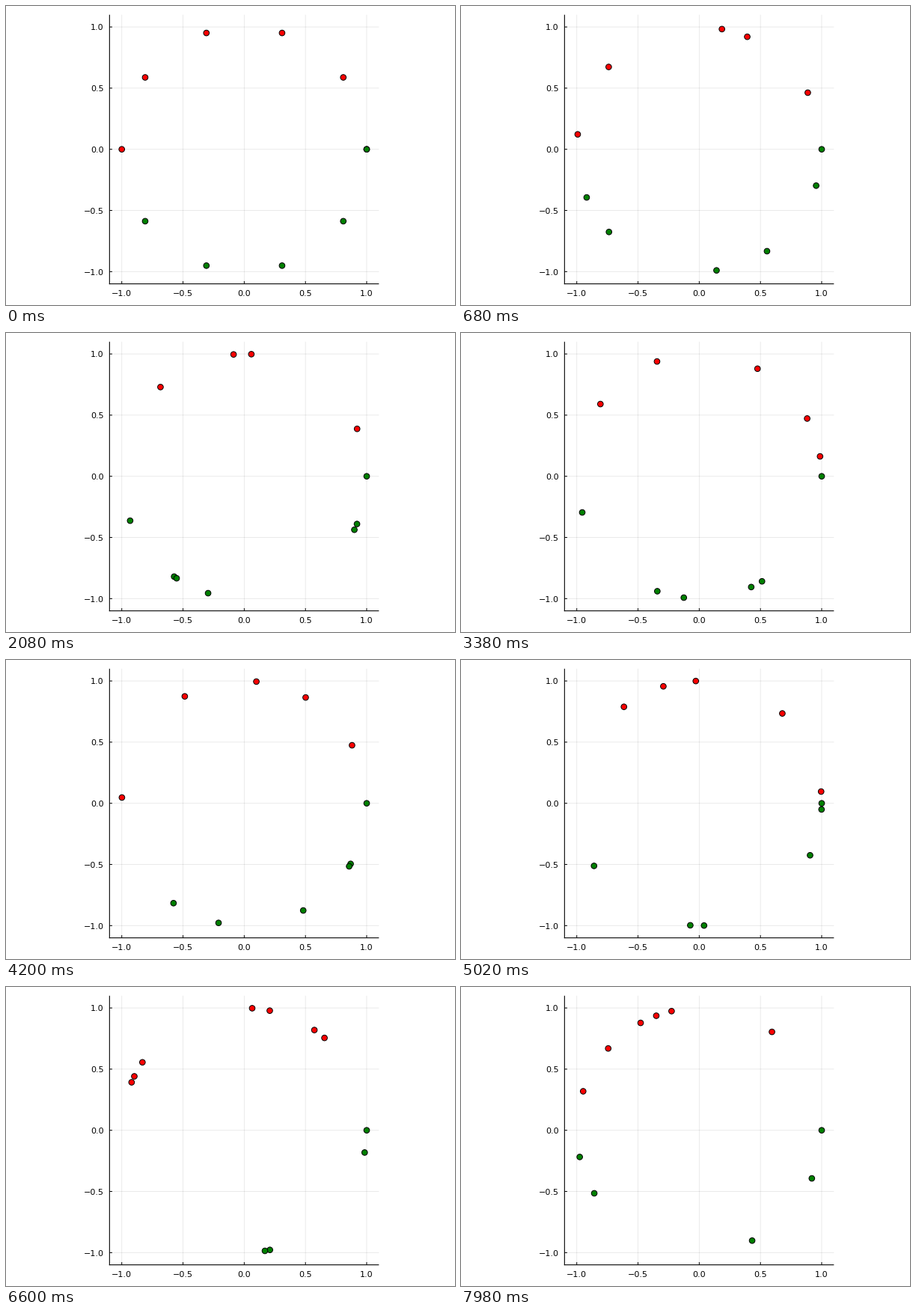
Write a matplotlib script that moves like this. It is 600 by 400 pixels and loops after 8 s.

```python
import numpy as np
import matplotlib.pyplot as plt
from matplotlib.animation import FuncAnimation
from matplotlib.patches import Circle

W, H, DPI = 600, 400, 100
PX = 72 / DPI                      # one pixel in points
CX, CY, HALF = 318.35, 191.7, 180  # plot centre and half side in pixels
UNIT = HALF / 1.1
TICKS = (-1.0, -0.5, 0.0, 0.5, 1.0)
LEFT, RIGHT, TOP, BOTTOM = CX - HALF, CX + HALF, CY - HALF, CY + HALF

START = np.linspace(0, 2 * np.pi, 11)
SPEED = np.radians([0, 2.2080, 0.5228, 2.1201, 2.0702, 1.6553,
                    0.4655, 1.8655, 1.1146, 1.3368, 1.9699])  # per step

fig = plt.figure(figsize=(W / DPI, H / DPI), dpi=DPI, facecolor="white")
ax = fig.add_axes([0, 0, 1, 1])
ax.set_xlim(0, W)
ax.set_ylim(H, 0)
ax.axis("off")


def line(x0, y0, x1, y1, width=1.0, **style):
    ax.plot([x0, x1], [y0, y1], color="black", lw=width * PX, snap=False,
            solid_capstyle="butt", **style)


def label(x, y, value, align):
    text = f"{value:.1f}".replace("-", "\u2212")
    ax.text(x, y, text, ha=align, va="baseline", fontsize=8,
            family="DejaVu Sans", color="black")


for v in TICKS:
    x, y = CX + v * UNIT, CY - v * UNIT
    line(x, TOP, x, BOTTOM, 0.8, alpha=0.1, zorder=1)
    line(LEFT, y, RIGHT, y, 0.8, alpha=0.1, zorder=1)
    line(x, BOTTOM, x, BOTTOM - 3.6, zorder=2)
    line(LEFT, y, LEFT + 3.6, y, zorder=2)
    label(x, 387.6, v, "center")
    label(130.6, y + 4.2, v, "right")

line(LEFT, TOP, LEFT, BOTTOM + 0.5, 1.1, zorder=2)
line(LEFT - 0.5, BOTTOM, RIGHT, BOTTOM, 1.1, zorder=2)

dots = [ax.add_patch(Circle((CX, CY), 3.8, lw=PX, ec="black", zorder=3))
        for _ in START]


def step_at(tick):
    """Three steps every seven ticks; the middle one is held for five."""
    cycle, part = divmod(tick, 7)
    return 3 * cycle + (part > 0) + (part > 5)


def draw(tick):
    angles = START + SPEED * step_at(tick)
    for dot, a in zip(dots, angles):
        dot.center = CX + UNIT * np.cos(a), CY - UNIT * np.sin(a)
        dot.set_facecolor("red" if np.sin(a) > 0 else "green")
    return dots


anim = FuncAnimation(fig, draw, frames=400, interval=20,
                     init_func=lambda: draw(0), repeat=True, repeat_delay=0)
plt.show()
```
